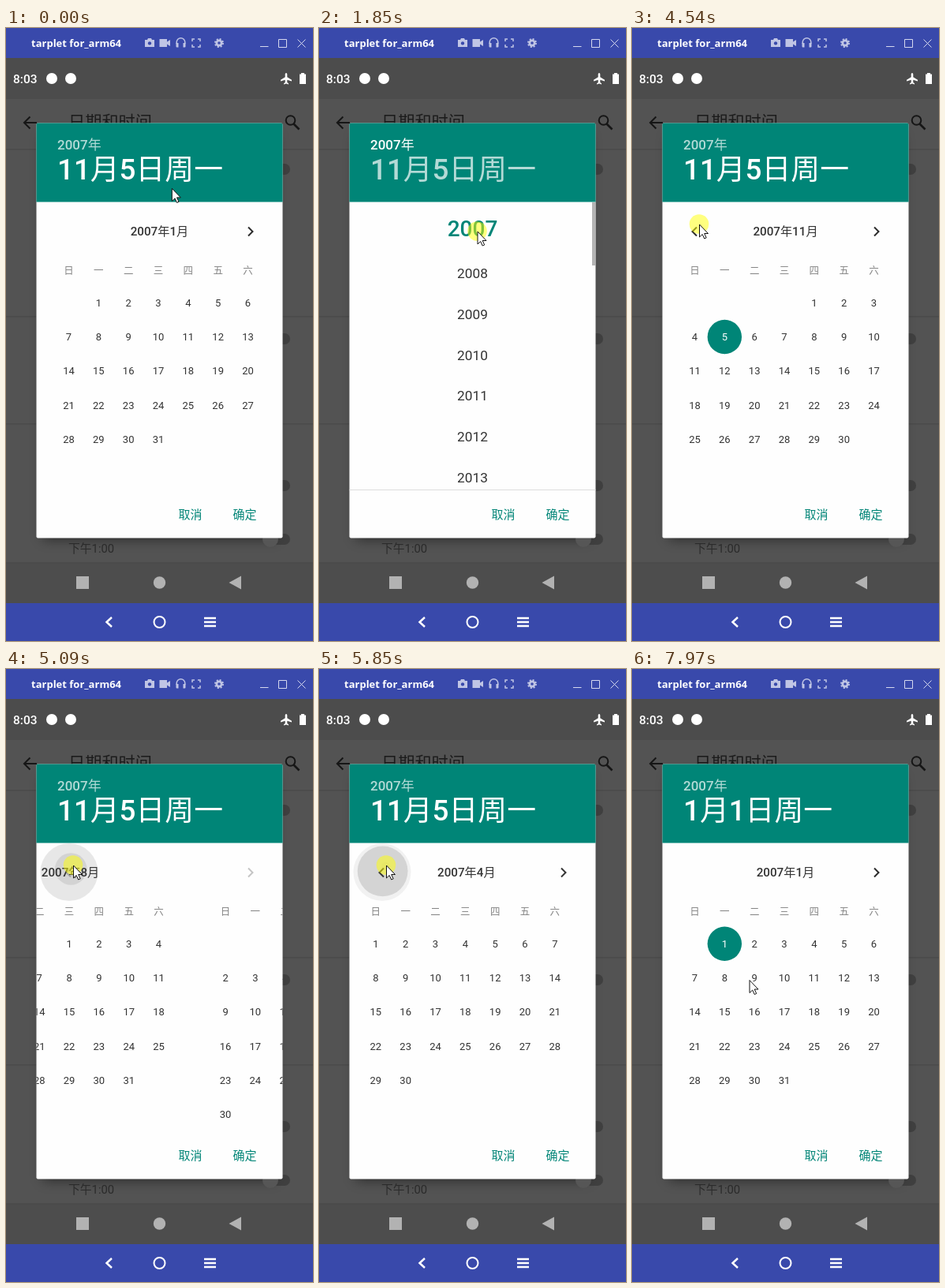
An HTML page for the animation above (8000 ms loop, 389 px wide and 777 px high).

```html
<!DOCTYPE html>
<html lang="zh-CN">
<head>
<meta charset="utf-8">
<title>日期和时间</title>
<style>
html, body { margin: 0; width: 100%; height: 100%; overflow: hidden; background: #535353; }
svg { display: block; width: 389px; height: 777px; }
text { font-family: Roboto, "Noto Sans CJK SC", "Noto Sans CJK", sans-serif; white-space: pre; }
.mid { text-anchor: middle; }
.med { font-weight: 500; }
.line { fill: none; stroke-width: 2; }
</style>
</head>
<body>
<svg id="stage" viewBox="0 0 389 777" xmlns="http://www.w3.org/2000/svg">
  <defs>
    <clipPath id="body"><rect x="38.5" y="220.5" width="312" height="364.5"/></clipPath>
    <filter id="soft" x="-20%" y="-10%" width="140%" height="125%"><feGaussianBlur stdDeviation="8"/></filter>
  </defs>

  <rect width="389" height="777" fill="#535353"/>
  <rect y="38" width="389" height="52" fill="#4c4c4c"/>
  <rect y="678" width="389" height="52" fill="#4d4d4d"/>
  <g id="rules" fill="#4b4b4b"></g>

  <!-- settings page behind the dialog -->
  <g class="line" stroke="#161616">
    <path d="M39 120H23M30.5 112.5L23 120L30.5 127.5"/>
    <circle cx="360.5" cy="117" r="5.8"/><path d="M364.5 121.5L371.5 128.5" stroke-width="2.6"/>
  </g>
  <text x="79" y="127" font-size="21.2" fill="#1c1c1c">日期和时间</text>
  <g id="toggles" fill="#404040"></g>
  <rect x="47" y="136" width="295" height="512" fill="#000" opacity=".5" filter="url(#soft)"/>
  <circle cx="335" cy="648" r="10" fill="#565656"/>
  <text x="79" y="665" font-size="14.8" fill="#2b2b2b">下午1:00</text>

  <!-- status bar -->
  <g fill="#fff">
    <text class="med" x="9" y="70" font-size="15.5">8:03</text>
    <circle cx="58" cy="64" r="7"/><circle cx="82" cy="64" r="7"/>
    <path d="M355 57c-1 0-1.3 1-1.3 2v3.2l-5.7 3.6v1.7l5.7-1.8v3.3l-1.7 1.2v1.2l3-.9l3 .9v-1.2l-1.7-1.2v-3.3l5.7 1.8v-1.7l-5.7-3.6V59c0-1-.3-2-1.3-2z"/>
    <path d="M374 57h4v1.5h2V71h-8V58.5h2z"/>
  </g>

  <!-- navigation -->
  <g fill="#b2b2b2"><rect x="89" y="695" width="16" height="16"/><circle cx="194.5" cy="703" r="7.7"/><path d="M282.5 703L298 694.5V711.5Z"/></g>
  <rect y="729" width="389" height="48" fill="#3949ab"/>
  <g class="line" stroke="#fff">
    <path d="M134 747L127.5 753L134 759" stroke-width="2.5"/>
    <circle cx="194.5" cy="753" r="7"/>
    <path d="M251 748H266M251 753H266M251 758H266" stroke-width="2.4"/>
  </g>

  <!-- window title -->
  <rect width="389" height="38" fill="#3949ab"/>
  <text x="32" y="24" font-size="13" font-weight="700" fill="#fff" style="font-family:'Open Sans',sans-serif">tarplet for_arm64</text>
  <g fill="#c0c5e5">
    <path fill-rule="evenodd" d="M176 15h3l1-2h4l1 2h3v9h-12zM182 17.2a2.2 2.2 0 1 0 .01 0z"/>
    <path d="M194.5 14h9.5v3.5l4-2.5v8l-4-2.5v3.5h-9.5z"/>
    <path d="M215.5 19h3v5.5h-2q-1 0-1-1zM224.5 19h3v4.5q0 1-1 1h-2z"/>
    <circle cx="270" cy="19" r="4.5"/>
  </g>
  <g fill="none" stroke="#c0c5e5" stroke-width="1.5">
    <path d="M216.2 20v-2a5.3 5.3 0 0 1 10.6 0v2M236 17v-3h3M243 14h3v3M246 21v3h-3M239 24h-3v-3"/>
    <circle cx="270" cy="19" r="5" stroke-width="2" stroke-dasharray="2 1.93"/>
  </g>
  <circle cx="270" cy="19" r="1.8" fill="#3949ab"/>
  <path d="M322 23.5H332.5M345.5 14.5h10v10h-10zM369.5 14.5l10 10M379.5 14.5l-10 10" fill="none" stroke="#d5d8ee"/>

  <!-- dialog -->
  <rect x="38.5" y="120.5" width="312" height="526" rx="2" fill="#fefefe"/>
  <path d="M38.5 220.5V122.5q0-2 2-2H348.5q2 0 2 2V220.5z" fill="#008577"/>
  <text id="year" class="med" x="65" y="154" font-size="17" fill="#fff">2007年</text>
  <text id="date" class="med" x="65" y="192" font-size="36.8" fill="#fff"></text>
  <g clip-path="url(#body)">
    <g id="cal">
      <g id="ripples"></g>
      <g class="line" stroke="#2c2c2c" stroke-width="2.2">
        <path id="prev" d="M82 252.5L76.5 258L82 263.5"/>
        <path id="next" d="M307 252.5L312.5 258L307 263.5"/>
      </g>
      <g id="pages"></g>
    </g>
    <g id="years"><rect x="346" y="221" width="4.5" height="80" fill="#b4b4b4"/></g>
  </g>
  <rect id="rule" x="38.5" y="585" width="312" height="1" fill="#dcdcdc"/>
  <g class="mid med" font-size="15" fill="#008577"><text x="233.5" y="622">取消</text><text x="302.5" y="622">确定</text></g>

  <g id="mouse">
    <circle id="glow" r="12.3" fill="#ff0" opacity=".5"/>
    <path d="M.5 .5V16.5L4.2 13L6.7 18.5L9.2 17.4L6.7 12H11.5Z" fill="#fff" stroke="#111"/>
  </g>
</svg>

<script>
const LOOP = 8000, PAGE_W = 311.5, INK = "#333";
const $ = id => document.getElementById(id);

function add(parent, tag, attrs, text) {
  const el = document.createElementNS("http://www.w3.org/2000/svg", tag);
  for (const k in attrs) el.setAttribute(k, attrs[k]);
  if (text !== undefined) el.textContent = text;
  parent.appendChild(el);
  return el;
}
const set = (el, k, v) => el.setAttribute(k, v);
const show = (el, on) => set(el, "visibility", on ? "visible" : "hidden");
const ramp = (t, a, b) => Math.min(1, Math.max(0, (t - a) / (b - a)));

for (const y of [153, 365, 501, 677]) add($("rules"), "rect", { y, width: 389, height: 1.5 });
for (const y of [179, 394, 580, 648]) add($("toggles"), "rect", { x: 332, y: y - 7, width: 28, height: 14, rx: 7 });

// month pages, January to November
const colX = c => 79.5 + 37.83 * c, rowY = r => 348.3 + 43.2 * r;
const picks = {};
function buildMonth(m) {
  const g = add($("pages"), "g", { class: "mid" });
  add(g, "text", { class: "med", x: 194.5, y: 263, "font-size": 15.2, fill: INK }, `2007年${m + 1}月`);
  [..."日一二三四五六"].forEach((d, c) =>
    add(g, "text", { x: colX(c), y: 312, "font-size": 12.5, fill: "#858585" }, d));
  const first = new Date(2007, m, 1).getDay(), count = new Date(2007, m + 1, 0).getDate();
  for (let d = 1; d <= count; d++) {
    const n = first + d - 1, x = colX(n % 7), y = rowY(Math.floor(n / 7));
    const picked = (m === 10 && d === 5) || (m === 0 && d === 1);
    const dot = picked && add(g, "circle", { cx: x, cy: y, r: 21.7, fill: "#008577" });
    const label = add(g, "text", { x, y: y + 4.7, "font-size": 13, fill: picked ? "#fff" : INK }, d);
    if (picked) picks[m] = { dot, label };
  }
  return g;
}
const pages = Array.from({ length: 11 }, (_, m) => buildMonth(m));

const list = add($("years"), "g", { class: "mid" });
for (let i = 0; i < 7; i++) add(list, "text", i
  ? { x: 194.5, y: 265 + 51.85 * i, "font-size": 17.3, fill: INK }
  : { x: 194.5, y: 264, "font-size": 28, class: "med", fill: "#008577" }, 2007 + i);

// ten taps on the back chevron
const taps = Array.from({ length: 10 }, (_, k) => 4708 + 171.3 * k);
const ripples = taps.map(() => add($("ripples"), "circle", { fill: "#000" }));

// pointer: time, x, y
const path = [
  [0, 210, 203], [300, 150, 172], [560, 71, 150], [960, 71, 150], [1350, 130, 205], [1720, 200.5, 257.5],
  [2120, 200.5, 257.5], [2600, 296, 608], [2740, 304, 625], [2940, 304, 625], [3210, 248.5, 406],
  [3480, 150, 305], [3740, 87, 252], [3960, 157, 327], [4180, 75, 270], [4340, 85, 248.5], [6680, 85, 248.5],
  [6810, 125, 342], [7200, 125, 342], [7600, 148.5, 394]
];
const presses = [[600, 860], [1840, 1960], [4535, 6590], [6945, 7280]];

function pointer(t) {
  const i = path.findIndex(p => p[0] > t);
  if (i < 0) return path[path.length - 1].slice(1);
  const [t0, x0, y0] = path[i - 1], [t1, x1, y1] = path[i], f = ramp(t, t0, t1);
  return [x0 + (x1 - x0) * f, y0 + (y1 - y0) * f];
}

function monthAt(t) {
  if (t < 2060 || t >= 6400) return 0;
  return taps.reduce((p, a) => p - 1 + (1 - ramp(t, a, a + 220)) ** 5, 10);
}

function render(t) {
  const yearMode = t >= 800 && t < 2060;
  const yearFade = ramp(t, 800, 1100) - ramp(t, 2060, 2360);
  set($("year"), "opacity", yearMode ? 1 : .7);
  set($("date"), "opacity", yearMode ? .7 : 1);
  const chosen = t >= 7215;
  $("date").textContent = chosen ? "1月1日周一" : "11月5日周一";
  set($("cal"), "opacity", 1 - yearFade);
  set($("years"), "opacity", yearFade);
  set($("rule"), "opacity", yearFade);

  const pos = monthAt(t), arrow = Math.abs(.5 - pos % 1) * 2;
  pages.forEach((g, m) => {
    set(g, "transform", `translate(${(m - pos) * PAGE_W} 0)`);
    show(g, Math.abs(m - pos) < 1);
  });
  set($("prev"), "opacity", arrow);
  set($("next"), "opacity", arrow);
  const canGoBack = t >= 2060 && t < 6330;
  show($("prev"), canGoBack);

  taps.forEach((a, k) => {
    const age = t - a + 90, grow = ramp(age, 0, 235), el = ripples[k];
    set(el, "cx", 85 - 5 * grow);
    set(el, "cy", 248.5 + 9 * grow);
    set(el, "r", 36.5 * grow);
    set(el, "opacity", canGoBack ? .12 * ramp(age, 0, 180) * (1 - ramp(age, 235, 485)) : 0);
  });

  // touch highlight, then the chosen day
  const { dot, label } = picks[0];
  set(dot, "opacity", chosen ? 1 : t >= 7015 ? .25 : 0);
  set(label, "fill", chosen ? "#fff" : INK);

  const [x, y] = pointer(t);
  set($("mouse"), "transform", `translate(${x} ${y})`);
  show($("glow"), presses.some(([a, b]) => t >= a && t < b));
}

function tick() {
  render(performance.now() % LOOP);
  requestAnimationFrame(tick);
}
tick();
</script>
</body>
</html>
```
